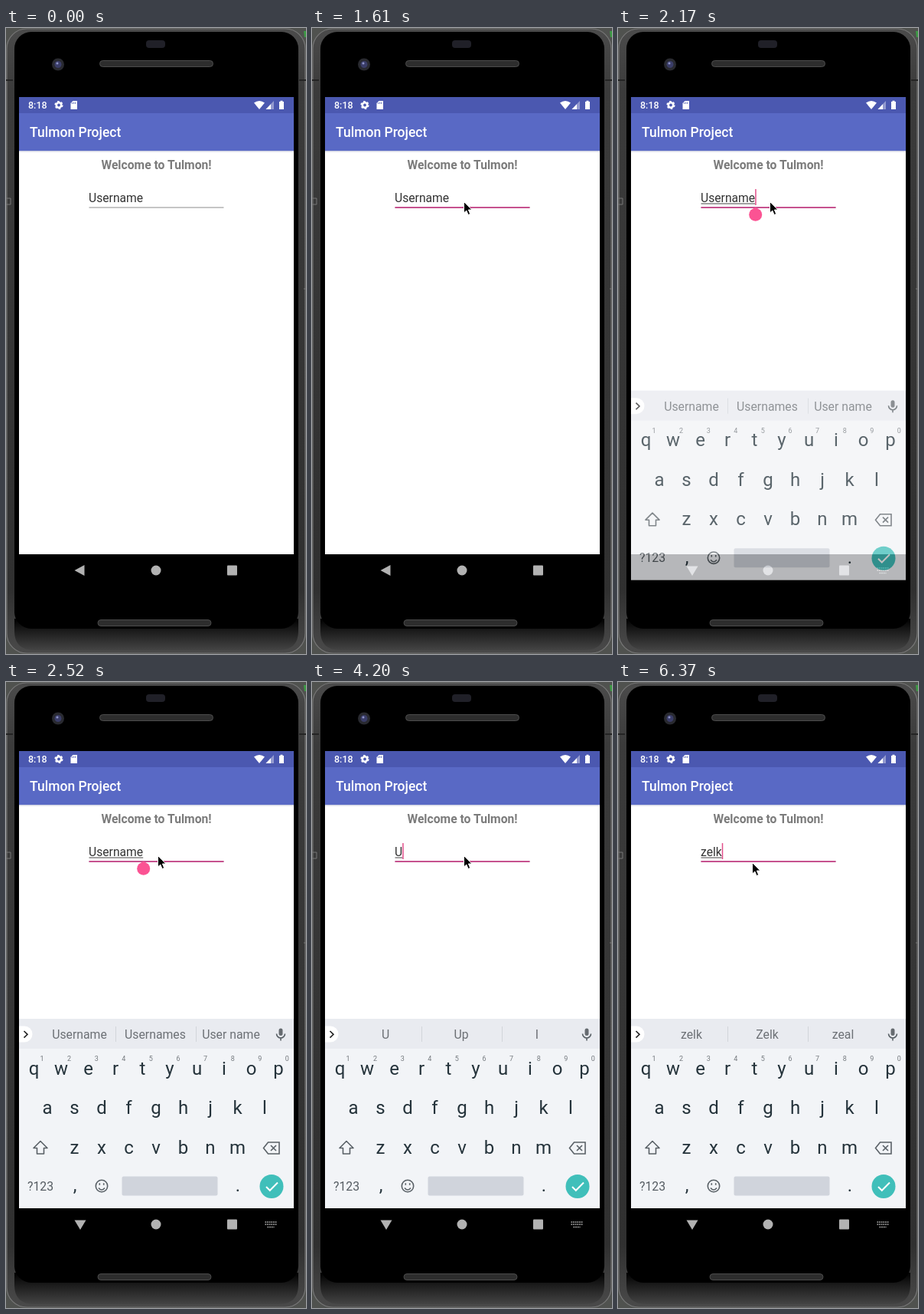
Animation of 392x816 px, one loop 6.44 s. Source, as an HTML page:

```html
<!DOCTYPE html>
<html lang="en">
<head>
<meta charset="utf-8">
<title>Phone sign-in</title>
<style>
  html, body { margin: 0; width: 100%; height: 100%; overflow: hidden; background: #50524f; }
  svg { display: block; width: 392px; height: 816px; font-family: Roboto, sans-serif; }
  .mid { text-anchor: middle; }
  .medium { font-weight: 500; fill: #fff; }
  .key { font-size: 24px; fill: #25333b; }
  .digit { font-size: 9px; fill: #74797e; }
  .word { font-size: 15.8px; fill: #6c7075; }
  .icon { fill: none; stroke: #596066; stroke-width: 1.6; }
</style>
</head>
<body>
<svg viewBox="0 0 392 816">
  <defs>
    <linearGradient id="rim" x2="0" y2="1">
      <stop offset="0" stop-color="#4b4b4b"/><stop offset=".1" stop-color="#3b3b3b"/>
      <stop offset=".9" stop-color="#303030"/><stop offset="1" stop-color="#4a4a4a"/>
    </linearGradient>
    <linearGradient id="chin" x2="0" y2="1">
      <stop offset="0" stop-color="#000"/><stop offset=".4" stop-color="#1c1c1c"/><stop offset="1" stop-color="#444"/>
    </linearGradient>
    <clipPath id="screen"><rect x="17" y="90" width="359" height="638"/></clipPath>
  </defs>

  <!-- phone body -->
  <rect x="1" y="1" width="390" height="814" rx="26" fill="url(#rim)" stroke="#777" stroke-width="1.2"/>
  <path d="M11 770H382V786Q382 811 356 811H37Q11 811 11 786Z" fill="url(#chin)"/>
  <rect x="11" y="5" width="371" height="778" rx="22"/>
  <path d="M0 68H9M383 68H392" stroke="#242424" stroke-width="2"/>
  <path d="M0 222H6V230H0M392 340H389" stroke="#777" fill="none"/>
  <path d="M389 4h3v8h-2z" fill="#3d9b45"/>
  <rect x="183" y="16" width="25" height="10" rx="4" fill="#202028"/>
  <g fill="#2d2d2d" stroke="#4c4c4c">
    <rect x="122.5" y="42.5" width="148" height="8" rx="4"/>
    <rect x="120" y="771.500" width="148" height="8" rx="4"/>
  </g>
  <circle cx="68" cy="47.500" r="8" fill="#292a30"/>
  <circle cx="68" cy="47.500" r="4.500" fill="#3a3d68"/>
  <circle cx="67" cy="46" r="1.500" fill="#8d93c8"/>

  <!-- app -->
  <rect x="17" y="90" width="359" height="596" fill="#fff"/>
  <rect x="17" y="160" width="359" height="1.500" fill="#d4d6e4"/>
  <rect x="17" y="111" width="359" height="49" fill="#5969c5"/>
  <rect x="17" y="90" width="359" height="21" fill="#4b58b0"/>
  <text class="medium" x="29" y="105" font-size="12.500">8:18</text>
  <circle cx="69" cy="100.500" r="3.200" fill="none" stroke="#fff" stroke-width="2.600"/>
  <circle cx="69" cy="100.500" r="4.900" fill="none" stroke="#fff" stroke-width="1.400" stroke-dasharray="2.600 2.530"/>
  <g fill="#fff">
    <path d="M87.500 95H93V106H84.500V98Z"/>
    <path d="M324 97.500Q331 92.500 338 97.500L331 106Z"/>
    <path d="M350 95V106H339.500Z" opacity=".4"/><path d="M346 99.200V106H339.500Z"/>
    <path d="M357 96H358.500V94.800H361.500V96H363V106H357Z"/>
  </g>
  <path d="M86.500 97v2M88.500 96.500v2.500M90.500 96.500v2.500" stroke="#4b58b0" stroke-width=".8"/>
  <text class="medium" x="31" y="142" font-size="17.500">Tulmon Project</text>
  <text class="mid" x="196.500" y="183.500" font-size="15.700" font-weight="700" fill="#7b7b7b">Welcome to Tulmon!</text>
  <text id="field" x="108" y="227" font-size="15.700" fill="#333"></text>
  <rect id="composing" x="108.500" y="228.500" height="1" fill="#444"/>
  <rect x="108.500" y="233.500" width="176" height="1" fill="#8c8c8c"/>
  <rect id="focusLine" y="233" height="2" fill="#c6528f"/>
  <rect id="caret" y="210" width="1.500" height="21" fill="#e2508b"/>
  <path id="handle" d="M0 233.500L6 237.200A8.500 8.500 0 1 1-6 237.200Z" fill="#fb5393"/>

  <!-- navigation -->
  <g fill="#b2b2b2">
    <path id="back"/>
    <circle cx="196" cy="707" r="6.500"/>
    <rect x="289" y="700.500" width="13" height="13" rx="1"/>
    <path id="switcher" d="M338.500 704h15M338.500 707h15M341.500 710.500h9" stroke="#b2b2b2" stroke-width="1.700" stroke-dasharray="1.700 .95"/>
  </g>

  <g clip-path="url(#screen)"><g id="keyboard">
    <rect x="17" y="439" width="359" height="247" fill="#f2f4f7"/>
    <rect x="17" y="439" width="359" height="39" fill="#e9ebf0"/>
    <path d="M17 448.500H24A10.500 10.500 0 0 1 24 469.500H17Z" fill="#fff"/>
    <path d="M23.500 455L28 459.300L23.500 463.600" class="icon" style="stroke:#222"/>
    <path d="M143.500 449V469M248.500 449V469" stroke="#d2d5da"/>
    <rect x="356.500" y="451.500" width="5" height="9.500" rx="2.500" fill="#666b70"/>
    <path d="M353.500 458.500a5.500 5.500 0 0 0 11 0M359 464v3.500" class="icon"/>
    <g id="keys"></g>
    <path class="icon" d="M45 598.500L54 607.500H49.500V615H40.500V607.500H36Z" stroke-linejoin="round"/>
    <path class="icon" d="M336.500 607.500L342.500 600H357V615H342.500ZM346 604l7 7M353 604l-7 7"/>
    <text class="word mid" x="45" y="662.500" style="fill:#555c62">?123</text>
    <text class="key mid" x="90" y="664">,</text>
    <text class="key mid" x="303" y="664">.</text>
    <circle class="icon" cx="125" cy="657" r="7.700"/>
    <path class="icon" d="M121 659.500Q125 664.500 129 659.500M122.300 653.200v2.600M127.700 653.200v2.600"/>
    <rect x="151.500" y="644.500" width="125" height="25" rx="2" fill="#d0d4dc"/>
    <circle cx="347" cy="657.500" r="15.500" fill="#40bfba"/>
    <path d="M340 658l4.800 4.800L355 652.500" fill="none" stroke="#fff" stroke-width="2"/>
  </g></g>

  <path id="mouse" d="M0 0V14.500L3.300 11.500L5.600 17L8.200 15.900L5.900 10.500H10.400Z" stroke="#fff" stroke-width="1"/>
</svg>

<script>
const LOOP = 6440, FOCUS = 1400, EDITING = 1890, KEYBOARD = 1960, BLINK = 500;
const $ = id => document.getElementById(id);
const clamp = v => Math.max(0, Math.min(1, v));
const progress = (t, from, to) => clamp((t - from) / (to - from));
const easeOut = p => 1 - (1 - p) ** 2;
const mix = (a, b, p) => a + (b - a) * p;
const show = (id, on) => $(id).setAttribute('visibility', on ? 'visible' : 'hidden');
const set = (id, attrs) => Object.entries(attrs).forEach(([k, v]) => $(id).setAttribute(k, v));

// time, field text, three suggestions
const edits = [
  [EDITING, 'Username', 'Username', 'Usernames', 'User name'],
  [2730, 'Usernam', 'Usernam', 'Username', 'Usernames'],
  [2940, 'Userna', 'Userna', 'Username', 'Usernames'],
  [3150, 'Usern', 'Usern', 'Usernames', 'Users'],
  [3430, 'User', 'User', 'Users', 'Username'],
  [3640, 'Use', 'Use', 'User', 'Used'],
  [3850, 'Us', 'Us', 'Use', 'User'],
  [4060, 'U', 'U', 'Up', 'I'],
  [4410, '', 'I', 'The', "I'm"],
  [4760, 'z', 'z', 'Z', 'zoo'],
  [4900, 'ze', 'ze', 'Ze', 'zero'],
  [5040, 'zel', 'zel', 'Zel', 'zeal'],
  [5250, 'zelk', 'zelk', 'Zelk', 'zeal'],
];

function addText(cls, x, y, text) {
  const el = document.createElementNS('http://www.w3.org/2000/svg', 'text');
  el.setAttribute('class', cls + ' mid');
  el.setAttribute('x', x);
  el.setAttribute('y', y);
  el.textContent = text;
  return $('keys').appendChild(el);
}

[['qwertyuiop', 36.5], ['asdfghjkl', 54], ['zxcvbnm', 89.5]].forEach(([row, x], r) =>
  [...row].forEach((c, i) => addText('key', x + 35.5 * i, 511.5 + 51.5 * r, c)));
[...'1234567890'].forEach((c, i) => addText('digit', 47 + 35.6 * i, 494, c));
const words = [96, 195, 294].map(x => addText('word', x, 465, ''));

function draw(t) {
  const editing = t >= EDITING, typing = t >= KEYBOARD;
  const [since, text, ...suggestions] = edits.findLast(e => e[0] <= t) || edits[0];

  $('field').textContent = text;
  const width = text ? $('field').getComputedTextLength() : 0;
  set('composing', { width: Math.max(0, width - 0.5) });
  show('composing', editing);
  set('caret', { x: 108 + width });
  show('caret', editing && Math.floor((t - since) / BLINK) % 2 === 0);
  set('handle', { transform: `translate(${108.5 + width} 0)` });
  show('handle', editing && since === EDITING);

  const spread = progress(t, FOCUS, FOCUS + 150);
  const left = mix(198, 108.5, spread);
  set('focusLine', { x: left, width: mix(198, 284.5, spread) - left });

  const rise = easeOut(progress(t, KEYBOARD, 2380));
  set('keyboard', { opacity: rise, transform: `translate(0 ${136 * (1 - rise)})` });
  words.forEach((el, i) => el.textContent = suggestions[i]);
  set('back', { d: typing ? 'M89.5 701.500H104.500L97 714Z' : 'M89.5 707L102.500 700V714Z' });
  show('switcher', typing);

  const enter = easeOut(progress(t, 420, 1050)), leave = progress(t, 6160, 6350);
  const x = mix(235, 198.5, enter) - 23 * leave, y = mix(818, 226.5, enter) + 9 * leave;
  set('mouse', { transform: `translate(${x} ${y})` });
}

const start = performance.now();
function frame() {
  draw((performance.now() - start) % LOOP);
  requestAnimationFrame(frame);
}
frame();
</script>
</body>
</html>
```
